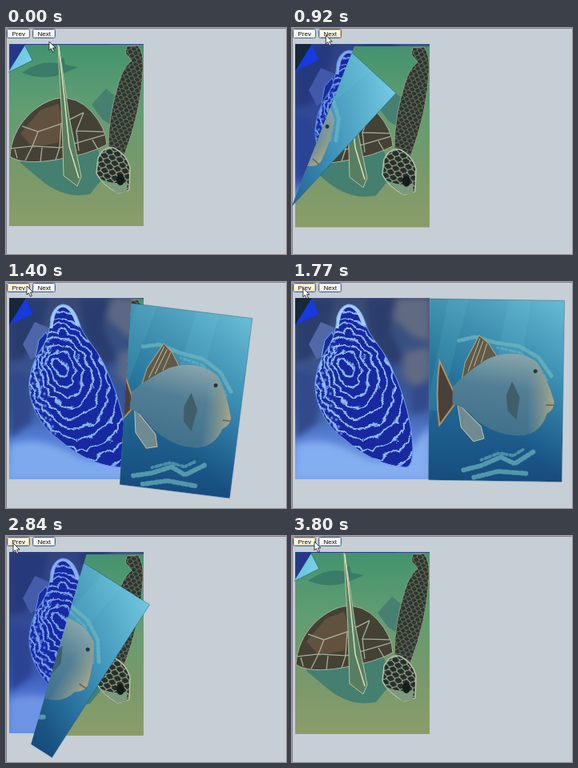
These frames come from a looping animation (350 by 283 pixels, 4000 ms). An HTML page:

```html
<!DOCTYPE html>
<html lang="en">
<head>
<meta charset="utf-8">
<title>Page flip</title>
<style>
  html, body { margin: 0; height: 100%; overflow: hidden; background: #c6ced6; }
  svg { display: block; width: 100vw; height: 100vh; }
  text { font: 8px "Liberation Sans", Arial, sans-serif; text-anchor: middle; }
</style>
</head>
<body>
<svg viewBox="0 0 350 283" fill="none">
  <defs>
    <linearGradient id="lagoon" x2="0" y2="1">
      <stop stop-color="#43936f"/><stop offset=".35" stop-color="#629d72"/>
      <stop offset=".7" stop-color="#78996a"/><stop offset="1" stop-color="#8c9c6a"/>
    </linearGradient>
    <linearGradient id="reef" x2="0" y2="1">
      <stop stop-color="#3a4a70"/><stop offset=".6" stop-color="#3a5a9c"/>
      <stop offset=".76" stop-color="#567fd2"/><stop offset="1" stop-color="#769fe4"/>
    </linearGradient>
    <linearGradient id="sea" x2="0" y2="1">
      <stop stop-color="#37839f"/><stop offset=".45" stop-color="#23719a"/><stop offset="1" stop-color="#174c7e"/>
    </linearGradient>
    <linearGradient id="scales" x1=".5" x2=".35" y2="1">
      <stop stop-color="#86a4aa"/><stop offset=".4" stop-color="#527f95"/><stop offset="1" stop-color="#3f708b"/>
    </linearGradient>
    <linearGradient id="cheek">
      <stop offset=".1" stop-color="#8a9c92" stop-opacity="0"/><stop offset="1" stop-color="#aaa888"/>
    </linearGradient>
    <linearGradient id="shine" x1="1" x2=".55" y2=".7">
      <stop stop-color="#8eeaff"/><stop offset="1" stop-color="#5fbfe8" stop-opacity="0"/>
    </linearGradient>
    <linearGradient id="face" x2="0" y2="1">
      <stop stop-color="#fff"/><stop offset="1" stop-color="#ecebe6"/>
    </linearGradient>
    <pattern id="cells" width="10" height="12" patternUnits="userSpaceOnUse" patternTransform="rotate(15)">
      <path fill="#263029" d="M0 0h10v12H0z"/>
      <path stroke="#b9c7ac" d="M5 0v3L0 6v3l5 3 5-3V6L5 3"/>
    </pattern>
    <pattern id="plates" width="7" height="9" patternUnits="userSpaceOnUse" patternTransform="rotate(15)">
      <path fill="#2d342d" d="M0 0h7v9H0z"/>
      <path stroke="#7d8c76" stroke-width=".8" d="M3.5 0v2L0 4.5V7l3.5 2L7 7V4.5L3.5 2"/>
    </pattern>
    <pattern id="spots" width="6" height="7" patternUnits="userSpaceOnUse" patternTransform="rotate(20)">
      <path fill="#1a2b9e" d="M0 0h6v7H0z"/>
      <circle cx="3" cy="3" r="1.7" fill="#5f8bea"/>
    </pattern>
    <pattern id="mesh" width="3.5" height="3.5" patternUnits="userSpaceOnUse" patternTransform="rotate(35)">
      <path stroke="#a5bfc4" stroke-width=".5" opacity=".6" d="M0 0h3.5M0 0v3.5"/>
    </pattern>
    <filter id="soft"><feGaussianBlur stdDeviation="4"/></filter>
    <filter id="wavy">
      <feTurbulence baseFrequency=".045" numOctaves="2" seed="4"/>
      <feDisplacementMap in="SourceGraphic" scale="11" xChannelSelector="R" yChannelSelector="G"/>
    </filter>
    <clipPath id="leftPage"><path d="M4 20h168v227H4z"/></clipPath>
    <clipPath id="rightPage"><path d="M174 20h171v227H174z"/></clipPath>
    <clipPath id="angelBody"><path id="angelShape" d="M70 28C84 28 89 42 94 58C100 72 117 87 126 111C141 143 150 178 151 208Q151 232 142 232C110 230 83 212 66 197C39 178 28 148 29 126C31 105 38 93 47 79Q55 64 56 44Q60 30 70 28Z"/></clipPath>
    <clipPath id="folded"><polygon id="crease"/></clipPath>
  </defs>

  <path stroke="#85818c" d="M0 .5h350M.5 0v283"/>
  <g id="buttons"></g>

  <g clip-path="url(#leftPage)">
    <path fill="url(#reef)" d="M4 20h168v227H4z"/>
    <g filter="url(#soft)">
      <path fill="#2c3d6c" d="M4 20h50L43 70 22 96 4 100zM92 20h38l-8 40 18 36-17 10-26-40z"/>
      <path fill="#606b82" d="M132 20h40v55l-22-8-24-22zM142 88l30-6v35l-17 17-17-18z"/>
      <path fill="#31488a" d="M4 110l25 5 4 60-29 22zM150 130l22-6v34l-22 8z"/>
      <path fill="#84aff0" d="M4 205Q40 190 85 217T172 180v67H4z"/>
    </g>
    <path fill="#5168a8" d="M21 78L36 50 55 58 46 88 31 97z"/>
    <path fill="#1b2b98" stroke="#7ba8ee" d="M37 94l4-21 9-10 4 10-8 18z"/>
    <use href="#angelShape" fill="#18299f"/>
    <g clip-path="url(#angelBody)">
      <path fill="url(#spots)" d="M28 140l5-40 20-34 4 20-11 30 7 42 13 42-28-24z"/>
      <g id="stripes" filter="url(#wavy)" stroke="#8fbaf6" stroke-width="2.4"></g>
      <path stroke="#a5cdf8" stroke-width="7" d="M55 58Q57 29 71 28 84 29 91 54"/>
    </g>
    <use href="#angelShape" stroke="#6f9fec"/>
    <path id="tint" fill="#152cb5" d="M4 20h168v227H4z"/>
    <g id="fold">
      <path fill="#16283a" d="M4 20h21L4 54z"/>
      <path fill="#1639e2" d="M25 20l8 20L4 54z"/>
    </g>
  </g>

  <g clip-path="url(#folded)">
    <g id="turtle">
      <g clip-path="url(#leftPage)">
        <path fill="url(#lagoon)" d="M4 20h168v227H4z"/>
        <path fill="#397c68" d="M20 55Q41 39 65 43l7-8 2 10 16 3-16 7Q48 66 20 55z"/>
        <path fill="#477f70" d="M107 95l18-20 16 13-9 33-12-8z"/>
        <path fill="#447f70" d="M17 167L110 139 126 181 105 207Q72 214 42 188z"/>
        <path fill="#444135" stroke="#a7b49d" d="M5 160C7 120 39 92 65 87Q89 84 107 104T126 145Q105 157 63 164T5 160z"/>
        <path fill="#61523f" d="M18 131L43 102 65 94 72 114 66 142 34 149z"/>
        <path stroke="#a7ae9b" stroke-width="1.3" d="M6 150l27-3 35 2 55-16M20 122l20 7 29-10 28-14M40 129l-7 18-9 18M69 119l-2 30-5 15M97 105l-9 23 3 25M88 128l34 1M11 151l3 11M45 149l-2 18M108 139l7 12"/>
        <path fill="url(#plates)" stroke="#899a82" d="M151 22l14-1q8 10 6 32-2 49-23 105l-20-11q0-39 13-80 6-20 16-27l-8-10z"/>
        <path fill="#587e62" stroke="#b9c59e" d="M65 20l5 28 9 63 15 74-5 12-17-13-2-70-4-70z"/>
        <path stroke="#dce0b8" stroke-width="1.5" d="M66 22l7 65 6 60 12 40"/>
        <path fill="url(#cells)" stroke="#b3c2a8" stroke-width="1.5" d="M115 162Q121 148 134 149 150 156 155 174l-1 28-14 4Q120 195 113 181z"/>
        <path fill="#7c9b7c" d="M116 187q15 8 36 6l-1 11-12 2z"/>
        <ellipse cx="143" cy="189" rx="5" ry="7" fill="#141d18"/>
      </g>
    </g>
    <g id="flap">
      <g clip-path="url(#rightPage)">
        <path fill="url(#sea)" d="M174 20h171v227H174z"/>
        <path fill="#58a9bd" opacity=".2" d="M200 20h25l-34 140h-17zM275 20h28l-12 90h-32z"/>
        <path id="glare" fill="url(#shine)" d="M174 20h171v227H174z"/>
        <g stroke="#6db5be" stroke-linecap="round" stroke-dasharray="1 4 3 3">
          <path stroke-width="5" opacity=".75" d="M214 72l20-5 26 7 30 4 24 14 17 24"/>
          <path stroke-width="3" opacity=".6" d="M262 80l28 6 22 14 14 22"/>
          <path stroke-width="6" opacity=".7" d="M222 234l22-6 24-11 18 8 24-16M235 243l30-8 35 2"/>
          <path stroke-width="4" opacity=".6" d="M244 221l22-9 18 3 14-9"/>
        </g>
        <path fill="#4a4039" stroke="#b0905f" stroke-width="2" d="M210 140L190 98q-5 43 1 80l19-27z"/>
        <path fill="#5f5a4a" stroke="#b5a67c" d="M218 121l4-22 17-34 12 10 12 18z"/>
        <path stroke="#c5b78c" d="M226 110l14-41M233 104l11-32M242 99l7-24"/>
        <path fill="#6f8a90" stroke="#c1c0a5" d="M213 150l5 30 16 18 13-4-4-15z"/>
        <path id="trigger" fill="url(#scales)" d="M207 130Q222 113 249 95 284 79 311 97 326 119 334 147q0 10-9 15-6 21-27 27-31 4-61-18-11-15-30-20z"/>
        <use href="#trigger" fill="url(#mesh)"/>
        <path fill="url(#cheek)" d="M296 90q10 2 15 7 15 22 23 50 0 10-9 15-5 19-22 26-2-30-7-98z"/>
        <path fill="#3f5e6a" d="M281 122l10 20-4 28-11-11-2-19z"/>
        <path stroke="#655d50" stroke-width="1.5" d="M324 151h10"/>
        <circle cx="310" cy="109" r="2.5" fill="#25363e"/>
      </g>
      <path stroke="#164761" stroke-width=".6" opacity=".6" d="M174 20h171v227H174z"/>
    </g>
  </g>
  <path id="cursor" fill="#fff" stroke="#111" stroke-width=".8" d="M0 0v11l2.5-2.4 2 4.6 2-.9-2-4.4H8z"/>
</svg>

<script>
const $ = id => document.getElementById(id);
const LOOP = 4000, NEXT_AT = 640, PREV_AT = 2420, REST = .085;
const corner = { x: 4, y: 20 }, span = 341;
// time, x, y of the pointer tip
const pointer = [[0, 54, 17], [60, 53, 16], [500, 43, 9], [1100, 42, 9], [1400, 26, 5],
                 [1950, 8, 9], [2470, 8, 9], [2840, 9, 9], [3140, 20, 8], [3500, 28, 7], [LOOP, 28, 7]];
const buttons = [
  { label: 'Prev', x: 2, glow: 'none', down: [2270, 2470] },
  { label: 'Next', x: 34, glow: '#c3d5ee', down: [520, 640] }
];

$('buttons').innerHTML = buttons.map(({ label, x }) => `<g>
  <rect x="${x - .5}" y="1.5" width="28" height="11" rx="2" stroke="#41698a"/>
  <rect x="${x + .5}" y="2.5" width="26" height="9" rx="1"/>
  <text x="${x + 13.7}" y="10" fill="#111">${label}</text></g>`).join('');

$('stripes').innerHTML = Array.from({ length: 12 }, (_, i) => {
  const cx = 65 + i * 2, cy = 103 + i * 2.5;
  return `<ellipse cx="${cx}" cy="${cy}" rx="${7 + i * 8}" ry="${12 + i * 11}" transform="rotate(-20 ${cx} ${cy})"/>`;
}).join('');

const clamp = v => Math.min(1, Math.max(0, v));
const remaining = ms => Math.exp(-((Math.max(0, ms) / 494) ** 1.75));

function pointerAt(t) {
  const i = pointer.findIndex(key => key[0] > t);
  const [t0, x0, y0] = pointer[i - 1], [t1, x1, y1] = pointer[i];
  const k = (t - t0) / (t1 - t0);
  return [x0 + (x1 - x0) * k, y0 + (y1 - y0) * k];
}

function drawFlip(t) {
  const left = t < PREV_AT
    ? (1 - REST) * remaining(t - NEXT_AT)
    : (1 - REST) * (1 - remaining(t - PREV_AT));
  const bow = left * (1 - left);
  const tip = { x: corner.x + span * (1 - left), y: corner.y + 264 * bow };
  const angle = left * (66 + 4 * left * left);

  // The crease lies halfway between the corner and its folded place, at half the angle.
  const half = angle * Math.PI / 360, dx = -Math.sin(half), dy = Math.cos(half);
  const mx = (corner.x + tip.x) / 2, my = (corner.y + tip.y) / 2;
  const at = (along, across) => [mx + dx * along + dy * across, my + dy * along - dx * across];
  $('crease').setAttribute('points', [at(-500, 0), at(-500, 700), at(500, 700), at(500, 0)].join(' '));

  $('flap').setAttribute('transform', `translate(${tip.x} ${tip.y}) rotate(${angle}) translate(-345 -20)`);
  $('turtle').setAttribute('transform', `translate(0 ${12 * bow})`);
  $('glare').setAttribute('opacity', .55 + .25 * left);
  $('tint').setAttribute('opacity', .4 * left);

  const open = clamp((t - NEXT_AT) / 200) - clamp((t - PREV_AT) / 200);
  $('fold').setAttribute('transform', `translate(4 20) scale(${open}) translate(-4 -20)`);
}

function drawControls(t) {
  const [x, y] = pointerAt(t);
  $('cursor').setAttribute('transform', `translate(${x} ${y})`);
  buttons.forEach((button, i) => {
    const [frame, ring] = $('buttons').children[i].children;
    const pressed = t >= button.down[0] && t < button.down[1];
    const hover = x >= button.x && x < button.x + 28 && y < 13;
    frame.setAttribute('fill', pressed ? '#dfded5' : 'url(#face)');
    ring.setAttribute('stroke', pressed ? 'none' : hover ? '#f3bd57' : button.glow);
  });
}

function draw() {
  const t = performance.now() % LOOP;
  drawFlip(t);
  drawControls(t);
  requestAnimationFrame(draw);
}
draw();
</script>
</body>
</html>
```
